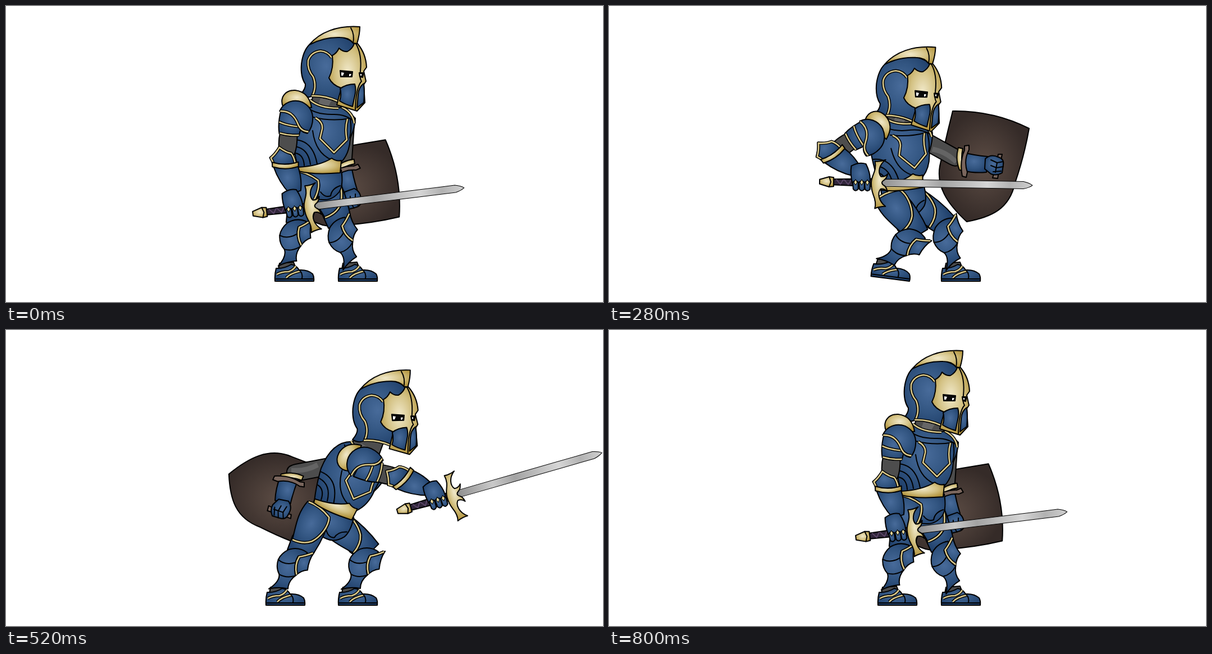
Write an HTML page that moves like this. It is 1063 by 527 pixels and loops after 840 ms.

```html
<!DOCTYPE html>
<html lang="en">
<head>
<meta charset="utf-8">
<title>Knight thrust</title>
<style>
  html, body { margin: 0; width: 100%; height: 100%; overflow: hidden; background: #fff; }
  svg { display: block; width: 100%; height: 100%; }
  path { stroke: #000; stroke-width: 2; stroke-linejoin: round; stroke-linecap: round; }
  .line, .edge, .inlay { fill: none; }
  .edge { stroke-width: 5.5; stroke-linecap: butt; }
  .inlay { stroke: #d9c88a; stroke-width: 2.6; stroke-linecap: butt; }
  .thin { stroke-width: 1; }
  .bare { stroke: none; }
</style>
</head>
<body>
<svg id="stage" viewBox="0 0 1063 527">
  <defs>
    <radialGradient id="blue" cx=".48" cy=".45" r=".62">
      <stop offset="0" stop-color="#486b9a"/><stop offset=".55" stop-color="#335682"/><stop offset="1" stop-color="#20406b"/>
    </radialGradient>
    <radialGradient id="gold" cx=".5" cy=".42" r=".6">
      <stop offset="0" stop-color="#f1e9ca"/><stop offset=".55" stop-color="#d3c183"/><stop offset="1" stop-color="#b1923a"/>
    </radialGradient>
    <radialGradient id="wood">
      <stop offset="0" stop-color="#5d4d45"/><stop offset="1" stop-color="#352b28"/>
    </radialGradient>
    <linearGradient id="steel" gradientUnits="userSpaceOnUse" x1="38" y1="-10" x2="307" y2="10">
      <stop offset="0" stop-color="#8d8d8d"/><stop offset=".25" stop-color="#c9c9c9"/><stop offset=".4" stop-color="#a3a3a3"/>
      <stop offset=".7" stop-color="#d6d6d6"/><stop offset=".85" stop-color="#b2b2b2"/><stop offset="1" stop-color="#d0d0d0"/>
    </linearGradient>
  </defs>
</svg>
<script>
const shape = (fill, d, cls = '') => `<path class="${cls}" fill="${fill}" d="${d}"/>`;
const blue = d => shape('url(#blue)', d);
const gold = d => shape('url(#gold)', d);
const gray = d => shape('#4d4d4d', d);
const strap = d => shape('#7a665d', d);
const line = d => `<path class="line" d="${d}"/>`;
const trim = d => `<path class="edge" d="${d}"/><path class="inlay" d="${d}"/>`;

const thighArt =
  blue('M520 305Q548 300 558 322Q563 360 556 398L514 396L511 370Z') +
  blue('M507 303Q530 297 555 310C564 325 558 350 548 364Q535 378 514 377C508 350 500 330 507 303Z') +
  trim('M509 303Q530 300 554 311C561 326 556 349 546 363Q535 375 514 376');

const shinArt =
  blue('M512 391Q498 399 494 410Q490 424 497 436Q499 449 480 463Q497 458 514 461Q514 447 526 437L545 395Q530 385 512 391Z') +
  line('M494 410Q506 420 524 414') + line('M497 436Q510 443 526 437') +
  blue('M557 394Q546 399 529 402Q521 417 526 437Q536 427 547 426Q548 408 557 394Z') +
  trim('M555 395Q542 401 531 403Q523 418 528 435');

const footArt =
  gray('M487 458L512 456L516 466L485 468Z') +
  blue('M481 467Q478 478 479 490H548Q549 482 546 477Q537 469 522 470Q517 462 508 460Q495 468 481 467Z') +
  trim('M482 478Q490 473 503 473Q512 470 516 463') +
  trim('M499 484Q506 476 524 472') + line('M479 486H548') + line('M522 470Q529 476 527 485');

const shieldArt = shape('url(#wood)',
  'M612 187Q685 186 748 218Q740 265 723 315C713 362 680 376 637 384C600 350 583 320 589 285Q600 235 612 187Z');

const farUpperArt = gray('M-70 -15H-6Q10 -12 10 0Q10 15 -8 15H-70Z') +
  shape('#646464', 'M-48 2Q-22 -6 2 2L0 10Q-24 3 -46 11Z', 'bare');

const farForearmArt =
  blue('M628 260Q650 266 674 268L672 296Q650 298 630 293Z') +
  gold('M622 252L630 254Q625 274 632 293L624 292Q616 272 622 252Z') +
  strap('M633 249L641 248L641 256Q631 275 638 296L636 305L629 303Q624 276 633 257Z') +
  strap('M693 264L700 264Q695 286 692 307L683 306Q690 285 693 264Z') +
  blue('M670 272Q680 263 693 269Q704 272 702 283L700 297Q690 303 680 299L669 290Z') +
  line('M680 274L691 279L702 277') + line('M680 284L690 288L702 286') + line('M684 295L698 294M691 279L688 296');

const pelvisArt =
  blue('M520 290L597 292Q601 318 594 330Q582 346 566 345Q540 345 522 330Z') +
  line('M595 320Q580 325 578 338Q568 342 560 331');

const torsoArt =
  gray('M548 148L596 150L597 182Q565 187 545 168Z') +
  shape('#666', 'M560 164L580 168L574 178L556 175Z', 'bare') +
  blue('M542 168C522 176 510 195 510 232Q513 262 520 288L597 278Q612 262 613 235Q622 215 622 200L601 180Q568 186 542 168Z') +
  line('M533 178Q550 194 584 193Q606 193 620 206') +
  trim('M541 167Q558 182 592 182') + trim('M598 180Q618 190 620 209') +
  line('M547 198Q580 206 613 200Q616 220 612 235') +
  line('M512 238Q546 238 554 281') + line('M514 250Q538 253 542 282') + line('M516 262Q530 265 531 284') +
  line('M546 222Q551 262 580 274') +
  trim('M551 199Q565 207 563 219L559 236L584 261L607 238Q603 218 608 201') +
  gold('M520 287Q558 285 580 271Q588 277 597 275L595 297Q548 301 521 294Z');

const helmArt =
  blue('M540 69Q565 52 600 56Q614 60 620 67L620 80L591 170Q565 162 546 160Q536 166 524 158Q534 147 533 139Q524 126 526 103Q529 80 540 69Z') +
  gold('M540 69C558 47 590 34 630 37Q630 50 625 67L618 66Q611 56 595 56Q566 55 540 69Z') +
  line('M614 39Q621 51 618 66') +
  trim('M545 161Q554 144 547 126Q536 113 538 97Q543 82 560 80Q573 81 580 92') +
  trim('M544 160Q568 159 592 170') +
  gold('M581 88Q589 84 593 75Q600 82 608 81Q617 76 620 67L626 67Q641 85 642 109L637 116L641 134L637 140L639 172L625 187L589 176L597 146Q581 141 575 128Q584 110 581 88Z') +
  blue('M595 147Q606 139 621 139Q624 148 621 160L617 179Q603 175 594 169Q598 158 595 147Z') +
  blue('M637 138Q628 144 627 158L625 181L637 172Q639 155 637 138Z') +
  line('M623 67Q634 86 631 116Q629 128 633 134Q623 145 622 184') +
  shape('#080808', 'M595 115L617 117L616 126L596 126Z') +
  shape('#080808', 'M629 119L637 119L635 127L630 126Z') +
  shape('#fff', 'M597 118L602 119L600 124H597ZM611 121L615 121L613 125H611ZM631 121H633V124H631Z', 'bare');

const upperArmArt =
  gray('M488 226L518 230Q518 256 512 268L486 264Q483 245 488 226Z') +
  blue('M490 186Q483 212 486 230Q503 236 521 234L530 200Z') +
  trim('M486 209Q500 216 523 218') + trim('M487 229Q503 234 521 233');

const shoulderArt =
  gold('M493 182C487 166 497 152 515 153C531 155 541 166 544 184Z') +
  blue('M487 190C494 174 512 168 527 174Q545 183 546 202Q546 219 536 230Q523 228 518 213Q510 190 487 190Z') +
  trim('M488 190Q510 189 519 212Q524 226 538 227');

const forearmArt =
  blue('M476 281Q498 291 519 287Q523 310 517 331L497 334Q481 310 476 281Z') +
  blue('M492 247Q483 258 472 264Q476 272 477 278L516 282Q516 268 512 262Q501 258 492 247Z') +
  trim('M477 277Q476 270 474 265Q484 259 492 249Q501 259 511 263Q515 270 515 280') +
  gold('M475 273Q497 284 521 280L520 288Q497 292 474 281Z');

const knuckles = [13, 3, -8];
const gem = x => shape('#e8d99a', `M${x} -5L${x + 3} 0L${x} 5L${x - 3} 0Z`, 'thin');
const finger = x => blue(`M${x - 5} 0Q${x} -5 ${x + 5} 0L${x + 5} 12Q${x} 18 ${x - 4} 12Z`);
const wrap = x => `<path d="M${x} -4L${x + 7} 4L${x + 12} -4" style="stroke:#5a4566" fill="none"/>`;
const swordArt =
  shape('url(#steel)', 'M44 -6.5H291Q302 -4 307 0Q302 4 291 6.5H44Q34 0 44 -6.5Z', 'thin') +
  shape('#30263a', 'M-49 -5L22 -7V7L-49 5Z') + [-42, -28, -14, 8].map(wrap).join('') +
  gold('M-72 -4L-55 -9L-47 -8V8L-55 9L-72 4Z') + line('M-55 -9L-52 0L-55 9') +
  gold('M20 0C20 -14 30 -20 26 -38Q35 -37 45 -41C33 -32 31 -18 37 -11Q44 -10 49 -16Q47 -7 43 -5Q35 0 43 5Q47 7 49 16Q44 10 37 11C31 18 33 32 46 42Q36 42 27 46Q30 36 24 22Q20 12 20 0Z') +
  blue('M-16 -29Q-2 -37 10 -33Q18 -18 18 -4L16 7Q0 8 -14 1Q-18 -15 -16 -29Z') +
  knuckles.map(finger).join('') + knuckles.map(gem).join('');

// Adds a part on top of the earlier ones; the returned function puts its pivot at a point, turned by an angle.
const stage = document.getElementById('stage');
function part(art, px, py) {
  const node = document.createElementNS('http://www.w3.org/2000/svg', 'g');
  node.innerHTML = art;
  stage.append(node);
  return ([x, y], angle) =>
    node.setAttribute('transform', `translate(${x} ${y}) rotate(${angle}) translate(${-px} ${-py})`);
}
const leg = () => ({ foot: part(footArt, 548, 490), thigh: part(thighArt, 533, 312), shin: part(shinArt, 526, 397) });

const shield = part(shieldArt, 658, 293);
const farUpper = part(farUpperArt, 0, 0);
const farForearm = part(farForearmArt, 658, 293);
const farLeg = leg();
const pelvis = part(pelvisArt, 558, 287);
const nearLeg = leg();
const torso = part(torsoArt, 558, 287);
const helm = part(helmArt, 605, 121);
const upperArm = part(upperArmArt, 517, 198);
const forearm = part(forearmArt, 498, 281);
const sword = part(swordArt, 0, 0);
const shoulder = part(shoulderArt, 517, 198);

// Key poses: x, y and tilt of what leads the motion, elbow bend and foot slide. Limbs follow from these.
const POSES = [
  { at: 0,   body: [558, 287, 0],  head: [605, 121, 0],    hand: [511, 361, -7],  shield: [596, 322, 67],  limbs: [16, 0] },
  { at: 160, body: [532, 292, -3], head: [575, 133, 3],    hand: [475, 326, 1],   shield: [629, 315, 32],  limbs: [32, -7] },
  { at: 280, body: [521, 317, -6], head: [555, 157, 1],    hand: [447, 314, 1],   shield: [658, 293, 0],   limbs: [57, -13] },
  { at: 440, body: [519, 338, -8], head: [551, 169, 0],    hand: [442, 321, -4],  shield: [672, 262, -27], limbs: [62, -16] },
  { at: 520, body: [585, 315, 22], head: [697, 156, -1.5], hand: [766, 303, -16], shield: [484, 290, 98],  limbs: [-8, -16] },
  { at: 640, body: [560, 303, 16], head: [665, 165, 13],   hand: [642, 340, -17], shield: [532, 316, 93],  limbs: [7, -5] }
];
POSES.push({ ...POSES[0], at: 800 });

// Hermite easing: rests when idle and wound up, recoils at full speed after the thrust.
const REST = [0, 440, 800], THRUST = 520;
function slope(i, value, outgoing) {
  const { at } = POSES[i];
  if (REST.includes(at) || (at === THRUST && !outgoing)) return 0;
  const from = at === THRUST ? i : i - 1;
  return (value(POSES[i + 1]) - value(POSES[from])) / (POSES[i + 1].at - POSES[from].at);
}
function sample(name, time) {
  const next = POSES.findIndex(p => p.at > time);
  const i = next < 0 ? POSES.length - 2 : next - 1;
  const a = POSES[i], b = POSES[i + 1], span = b.at - a.at, u = (time - a.at) / span;
  return a[name].map((from, k) => {
    const value = pose => pose[name][k];
    return from + (value(b) - from) * u * u * (3 - 2 * u) +
      span * u * (1 - u) * ((1 - u) * slope(i, value, true) - u * slope(i + 1, value, false));
  });
}

const degrees = ([x0, y0], [x1, y1]) => Math.atan2(y1 - y0, x1 - x0) * 180 / Math.PI;
function attach([x, y, tilt], dx, dy) {
  const a = tilt * Math.PI / 180, c = Math.cos(a), s = Math.sin(a);
  return [x + dx * c - dy * s, y + dx * s + dy * c];
}
// A point so far along the line from p to q, and so far to its side.
function beside(p, q, along, side) {
  const length = Math.hypot(q[0] - p[0], q[1] - p[1]);
  const ux = (q[0] - p[0]) / length, uy = (q[1] - p[1]) / length;
  return [p[0] + ux * along - uy * side, p[1] + uy * along + ux * side];
}

const THIGH = 82, SHIN = 73;
function poseLeg(parts, hip, toe, tilt) {
  const ankle = attach([...toe, tilt], -49, -28);
  const reach = Math.hypot(ankle[0] - hip[0], ankle[1] - hip[1]);
  const along = reach > THIGH + SHIN
    ? reach * THIGH / (THIGH + SHIN)
    : (THIGH ** 2 - SHIN ** 2 + reach ** 2) / (2 * reach);
  const knee = beside(hip, ankle, along, -Math.sqrt(Math.max(0, THIGH ** 2 - along ** 2)));
  parts.foot(toe, tilt);
  parts.thigh(hip, degrees(hip, knee) - 91);
  parts.shin(knee, degrees(knee, ankle) - 115);
}

function poseKnight(time) {
  const [body, head, hand, guard, [bend, slide]] =
    ['body', 'head', 'hand', 'shield', 'limbs'].map(name => sample(name, time));
  const lift = time < 440 ? 8 * Math.sin(Math.PI * time / 440) : 0;
  const reach = hand[0] - body[0];

  torso(body, body[2]);
  pelvis(body, body[2]);
  helm(head, head[2]);
  poseLeg(nearLeg, attach(body, -23, 20), [548 + slide, 490], lift);
  poseLeg(farLeg, attach(body, 9, 23), [661, 490], 0);

  // Reaching forward twists the chest: the near shoulder advances, the far one draws back.
  const near = attach(body, -29 + 0.25 * reach, -92);
  const far = attach(body, 31 - 0.33 * reach, -68);

  const armLength = Math.hypot(hand[0] - near[0], hand[1] - near[1]);
  const elbow = beside(near, hand, 0.53 * armLength, bend);
  const swing = degrees(near, elbow) - 103;
  upperArm(near, swing);
  shoulder(near, 0.8 * swing);
  forearm(elbow, degrees(elbow, hand) - 90);
  sword(hand, hand[2]);

  const farElbow = attach(guard, -38, -21);
  farUpper(farElbow, degrees(far, farElbow));
  farForearm(guard, guard[2]);
  shield(guard, guard[2]);
}

const LOOP = 840, STEP = 40;
const start = performance.now();
function draw(now) {
  const elapsed = Math.max(0, now - start) % LOOP;
  poseKnight(Math.floor(elapsed / STEP) * STEP);
  requestAnimationFrame(draw);
}
draw(start);
</script>
</body>
</html>
```
